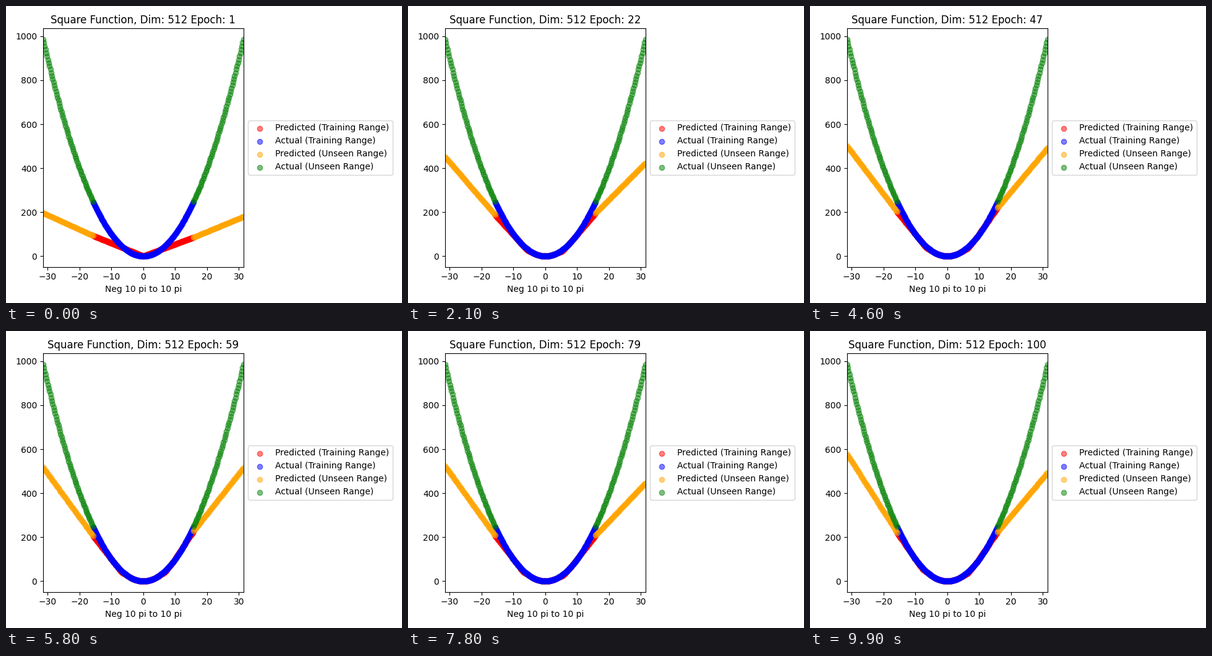
These frames come from a looping animation (640 px wide and 480 px high, 10 s). A matplotlib script:

```python
import numpy as np
import matplotlib.pyplot as plt
from matplotlib.animation import FuncAnimation

EPOCHS = 100
EDGE = 10 * np.pi
HALF = 5 * np.pi
POINTS = 250

# where each arm of the fit leaves the parabola, at a few moments of training
EPOCH_KEYS = np.log([1, 12, 33, 59, 71, 86, 100])
LEFT = [3.3, 7.5, 8.8, 9.75, 9.0, 10.6, 11.2]
RIGHT = [3.0, 6.7, 8.35, 9.7, 7.25, 8.9, 9.2]

x_seen = np.linspace(-HALF, HALF, POINTS)
x_new = np.linspace(-EDGE, EDGE, POINTS)
x_new = x_new[np.abs(x_new) > HALF]


def arm(r, epoch, kinks, bend):
    """Parabola up to the kink k, then its tangent, slightly bent at HALF."""
    t = np.log(epoch)
    k = np.interp(t, EPOCH_KEYS, kinks)
    mid = 2 * k * HALF - k ** 2 + bend * t
    end = 2 * k * EDGE - k ** 2
    fit = np.where(r < k, r ** 2, np.interp(r, [k, HALF, EDGE], [k ** 2, mid, end]))
    fit = fit - 5 * np.exp(-(r - 0.7 * k) ** 2)
    # the fit starts out as a plain V
    young = np.exp(-(epoch - 1) / 2) * (r < HALF)
    return fit + young * (mid / HALF * r - fit)


def predict(x, epoch):
    r = np.abs(x)
    return np.where(x < 0, arm(r, epoch, LEFT, -1.5), arm(r, epoch, RIGHT, 4))


def dots(x, y, color, label):
    return ax.scatter(x, y, color=color, alpha=0.5, label=label)


def update(i):
    epoch = i + 1
    for pts, x in ((red, x_seen), (orange, x_new)):
        pts.set_offsets(np.column_stack((x, predict(x, epoch))))
    ax.set_title(f"Square Function, Dim: 512 Epoch: {epoch}")
    return red, orange


fig, ax = plt.subplots(figsize=(6.4, 4.8), dpi=100)
red = dots(x_seen, predict(x_seen, 1), "red", "Predicted (Training Range)")
dots(x_seen, x_seen ** 2, "blue", "Actual (Training Range)")
orange = dots(x_new, predict(x_new, 1), "orange", "Predicted (Unseen Range)")
dots(x_new, x_new ** 2, "green", "Actual (Unseen Range)")

top = EDGE ** 2
ax.set_xlim(-EDGE, EDGE)
ax.set_ylim(-0.05 * top, 1.05 * top)
ax.set_xlabel("Neg 10 pi to 10 pi")
ax.legend(loc="center left", bbox_to_anchor=(1, 0.5))
update(0)
fig.tight_layout()
fig.subplots_adjust(right=383.8 / 640, top=444 / 480)

anim = FuncAnimation(fig, update, frames=EPOCHS, interval=100,
                     repeat=True, repeat_delay=0)
plt.show()
```
